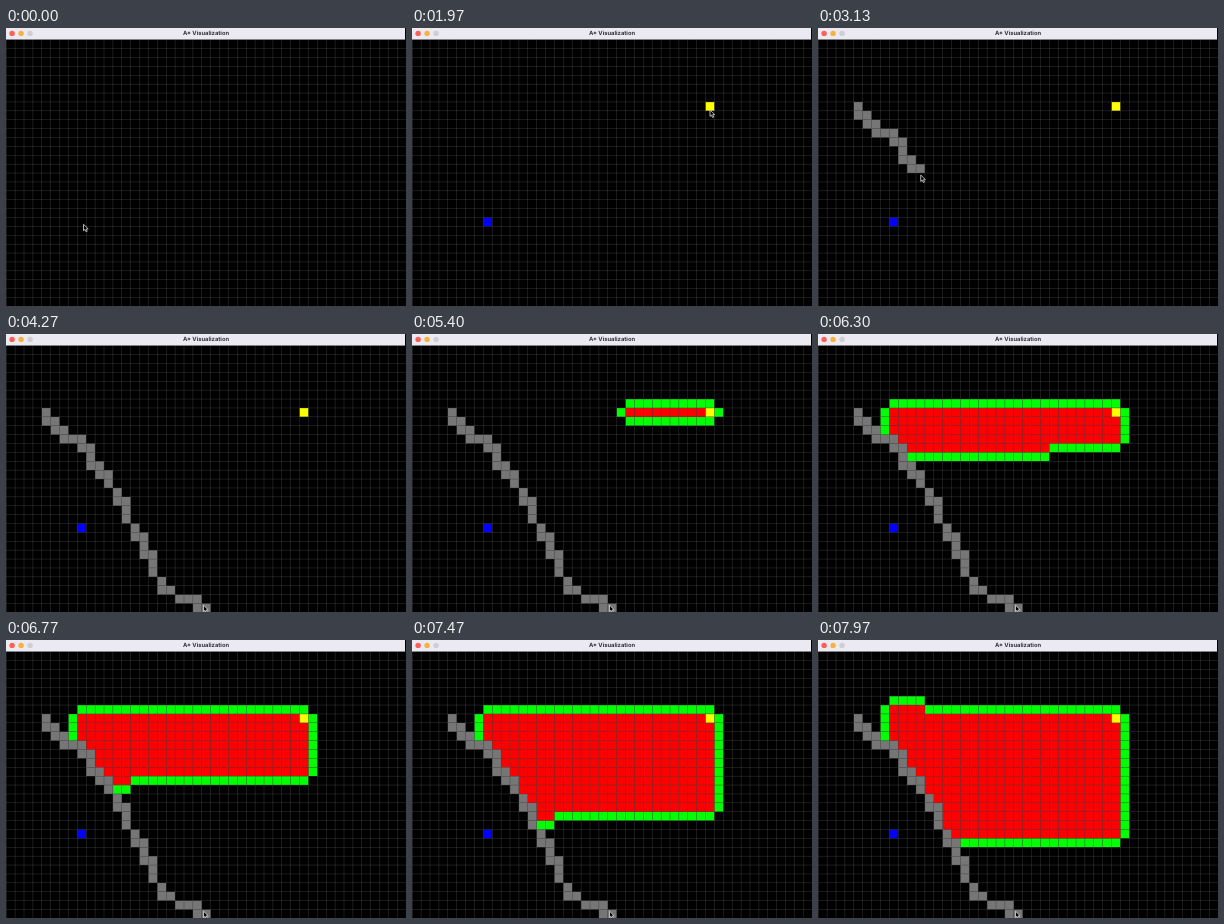
Write an HTML page with a canvas that moves like this. It is 400 px wide and 278 px high and loops after 8000 ms.

```html
<!DOCTYPE html>
<html lang="en">
<head>
<meta charset="utf-8">
<title>A* Visualization</title>
<style>
html, body { margin: 0; width: 100%; height: 100%; overflow: hidden; background: #000; }
canvas { display: block; }
</style>
</head>
<body>
<canvas id="stage" width="400" height="278"></canvas>
<script>
const ctx = document.getElementById('stage').getContext('2d');
const LOOP = 8000, COLS = 45, ROWS = 30;
const SIZE = 400 / COLS, TOP = 11.5, LINE = SIZE / 20;
const start = { col: 33, row: 7 }, goal = { col: 8, row: 20 };
const key = (col, row) => row * COLS + col;

// Wall runs from row 7 downward: first column and length
const runs = [[4,1],[4,2],[5,2],[6,3],[8,2],[9,1],[9,2],[10,2],[11,1],[12,1],[12,2],[13,1],
  [13,1],[14,1],[14,2],[15,1],[15,2],[16,1],[16,1],[17,1],[17,2],[19,3],[21,2]];
const walls = runs.flatMap(([col, n], i) =>
  Array.from({ length: n }, (_, j) => ({ col: col + j, row: 7 + i })));

// A* with Manhattan distance; ties go to the upper row, then the left column
function search(limit) {
  const blocked = new Set(walls.map(c => key(c.col, c.row)));
  const cells = new Map();
  const visit = (col, row, g, step) => {
    const id = key(col, row);
    if (col < 0 || row < 0 || col >= COLS || row >= ROWS || blocked.has(id) || cells.has(id)) return;
    const f = g + Math.abs(col - goal.col) + Math.abs(row - goal.row);
    cells.set(id, { col, row, g, f, id, opened: step, closed: Infinity });
  };
  visit(start.col, start.row, 0, 0);
  for (let step = 1; step <= limit; step++) {
    let best = null;
    for (const c of cells.values()) {
      if (c.closed === Infinity && (!best || c.f < best.f || (c.f === best.f && c.id < best.id))) best = c;
    }
    best.closed = step;
    const { col, row, g } = best;
    visit(col + 1, row, g + 1, step);
    visit(col - 1, row, g + 1, step);
    visit(col, row + 1, g + 1, step);
    visit(col, row - 1, g + 1, step);
  }
  return [...cells.values()];
}
const searched = search(340).filter(c => c.id !== key(start.col, start.row));

const lerp = (a, b, u) => a + (b - a) * u;
const progress = (t, a, b) => Math.min(1, Math.max(0, (t - a) / (b - a)));
const smooth = u => u * u * (3 - 2 * u);

// Position along the wall while it is being drawn
function wallIndex(t) {
  if (t < 2630) return -1;
  if (t < 3570) return 31 * progress(t, 2740, 3570);
  return lerp(31, walls.length - 1, smooth(progress(t, 3570, 4270)));
}

function onWall(index) {
  const i = Math.floor(index), a = walls[i], b = walls[Math.min(i + 1, walls.length - 1)];
  const shift = lerp(0.5, -2.5, progress(index, 31, 36));
  return [
    (lerp(a.col, b.col, index - i) + 0.5) * SIZE + shift,
    TOP + (lerp(a.row, b.row, index - i) + 0.5) * SIZE + shift
  ];
}

function pointer(t) {
  if (t < 1960) {
    const u = smooth(progress(t, 670, 1120));
    return [lerp(77.5, 298, u), lerp(196.3, 82, u)];
  }
  if (t < 2630) {
    const u = smooth(progress(t, 1970, 2620)), v = 1 - u;
    const [x, y] = onWall(0);
    return [lerp(298, x, u), v * v * 82 + 2 * u * v * 123 + u * u * y];
  }
  return onWall(wallIndex(t));
}

function fillCell({ col, row }, color) {
  ctx.fillStyle = color;
  ctx.fillRect(col * SIZE + LINE, TOP + row * SIZE + LINE, SIZE - LINE, SIZE - LINE);
}

function drawGrid() {
  ctx.fillStyle = '#383838';
  for (let c = 0; c < COLS; c++) ctx.fillRect(c * SIZE, TOP, LINE, ROWS * SIZE);
  for (let r = 0; r < ROWS; r++) ctx.fillRect(0, TOP + r * SIZE, 400, LINE);
}

function drawTitleBar() {
  ctx.fillStyle = '#ebe9f2';
  ctx.fillRect(0, 0, 399, TOP);
  ['#ff5f57', '#f6b23c', '#cfced4'].forEach((color, i) => {
    ctx.fillStyle = color;
    ctx.beginPath();
    ctx.arc(6.1 + 9 * i, 5.4, 2.7, 0, 7);
    ctx.fill();
  });
  ctx.fillStyle = '#333236';
  ctx.font = '700 5.8px Inter, sans-serif';
  ctx.textRendering = 'geometricPrecision';
  ctx.textAlign = 'center';
  ctx.textBaseline = 'alphabetic';
  ctx.fillText('A* Visualization', 200, 7.4);
}

function drawPointer([x, y]) {
  const shape = [[0,0],[0,6.4],[1.5,5.1],[2.6,7.5],[3.7,7],[2.7,4.7],[4.7,4.6]];
  ctx.beginPath();
  shape.forEach(([dx, dy]) => ctx.lineTo(x + dx, y + dy));
  ctx.closePath();
  ctx.fillStyle = '#000';
  ctx.fill();
  ctx.strokeStyle = '#dcdcdc';
  ctx.lineWidth = 0.8;
  ctx.stroke();
}

function draw(time) {
  const tick = Math.floor(time * 0.03 + 0.2);
  const t = tick / 0.03;
  ctx.fillStyle = '#000';
  ctx.fillRect(0, 0, 400, 278);

  // Adding light lets cells and lines share a pixel by their covered area
  ctx.globalCompositeOperation = 'lighter';
  drawGrid();
  const steps = Math.floor(63.2 + (tick - 175) * 4.05);
  if (steps > 0) {
    for (const c of searched) {
      if (c.opened <= steps) fillCell(c, c.closed <= steps ? '#f00' : '#0f0');
    }
  }
  const built = wallIndex(t);
  walls.forEach((c, i) => { if (i <= built + 0.01) fillCell(c, '#767676'); });
  if (tick >= 1) fillCell(goal, '#00f');
  if (tick >= 37) fillCell(start, '#ff0');
  ctx.globalCompositeOperation = 'source-over';

  drawTitleBar();
  drawPointer(pointer(t));
}

function loop() {
  draw(performance.now() % LOOP);
  requestAnimationFrame(loop);
}
loop();
</script>
</body>
</html>
```
